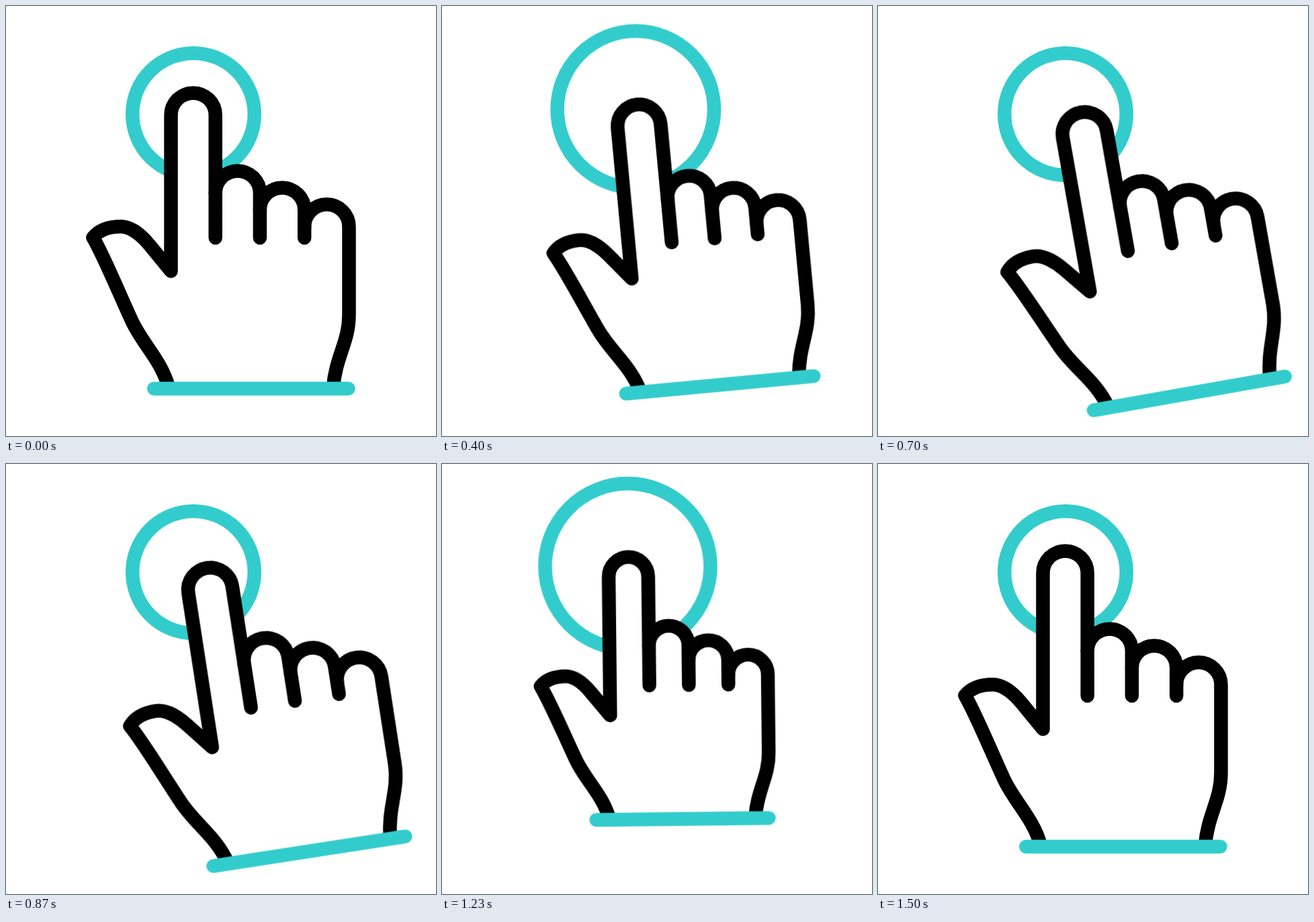
Animation of 640x640 px, one loop 1.67 s. Source, as an HTML page without scripts:

```html
<!DOCTYPE html>
<html lang="en">
<head>
<meta charset="utf-8">
<title>Tapping hand</title>
<style>
  html, body { margin: 0; height: 100%; overflow: hidden; background: #fff; }
  svg { display: block; width: 100vw; height: 100vh; }

  svg * {
    stroke-width: 20.5;
    stroke-linejoin: round;
    vector-effect: non-scaling-stroke;
  }
  .teal { stroke: #3cc; stroke-linecap: round; }
  .outline { fill: #fff; stroke: #000; }
  .folds { fill: none; stroke: #000; stroke-linecap: round; }

  .ring, .move, .press {
    animation: 1.67s cubic-bezier(.333, 0, .667, 1) infinite;
  }
  .ring { fill: none; animation-name: pulse; }
  .move { animation-name: swing; transform-origin: 278.5px 162px; }
  .press { animation-name: press; transform-origin: 252px 194px; }

  @keyframes pulse {
    0%, 14%, 42%, 60%, 90%, 100% { transform: translate(279px, 161px) scale(1); }
    28% { transform: translate(290.5px, 152.2px) scale(1.356); }
    74% { transform: translate(276.5px, 152.2px) scale(1.356); }
  }
  @keyframes swing {
    0%, 7.6%, 82%, 100% { transform: translate(0px, 0px) rotate(0deg); }
    39% { transform: translate(29px, 28.3px) rotate(-10deg); }
    45% {
      transform: translate(29px, 28.3px) rotate(-10deg);
      animation-timing-function: cubic-bezier(.33, 0, .45, 1);
    }
  }
  @keyframes press {
    0%, 4%, 28%, 57%, 86%, 100% { transform: scale(1); }
    14% { transform: scale(.849); }
    70% { transform: scale(.87); }
  }
</style>
</head>
<body>
<svg viewBox="0 0 640 640">
  <circle class="ring teal" r="90.8"/>
  <g class="move">
    <g class="press">
      <path class="outline" d="M242 567
        C231 527 203 503 187 468 C165 420 145 371 129.5 344.5
        C139 333 153 328.3 171 328.3 C187 328.3 203 343 213 355
        L245.5 394.5 V162.5 a33.1 33.1 0 0 1 66.2 0
        V278.5 a33.1 33.1 0 0 1 66.2 0
        V303.5 a33.1 33.1 0 0 1 66.3 0
        V328.5 a33.1 33.1 0 0 1 66.3 0
        V460 C510.5 500 491 521 487 567"/>
      <path class="folds" d="M311.7 278V345M377.9 303V345M444.2 328V345"/>
      <path class="teal" d="M220.3 569.5H509.5"/>
    </g>
  </g>
</svg>
</body>
</html>
```
